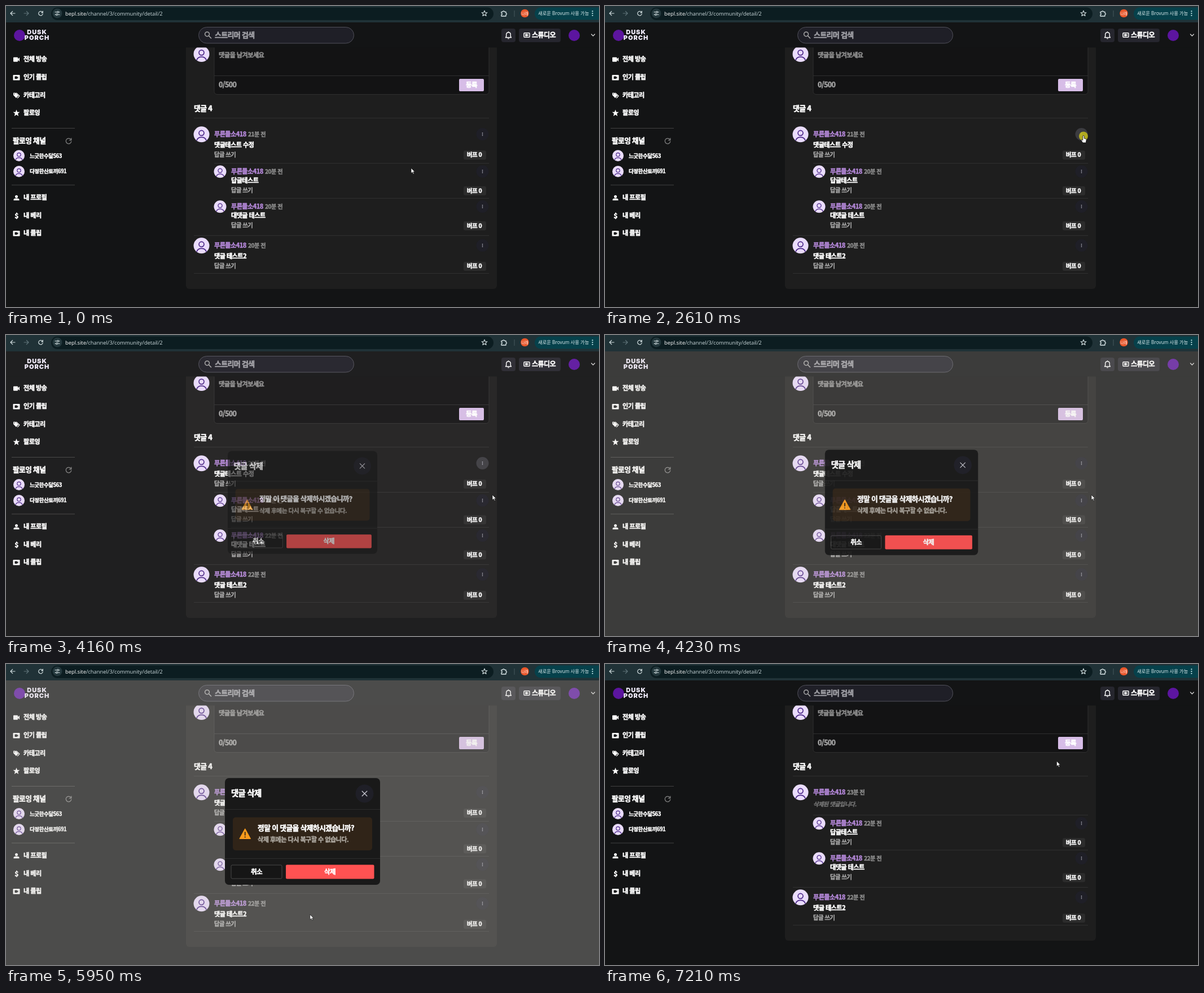
These frames come from a looping animation (1051 by 533 pixels, 8.42 s). An HTML page:

```html
<!DOCTYPE html>
<html lang="ko">
<head>
<meta charset="utf-8">
<title>Comment delete</title>
<style>
html, body { margin: 0; width: 100%; height: 100%; overflow: hidden; background: #131415; }
svg { display: block; width: 1051px; height: 533px; }
text { font-family: "Noto Sans CJK KR", "Noto Sans CJK", sans-serif; font-weight: 900; letter-spacing: -.05em; white-space: pre; }
.ui { font-family: "Open Sans", "Noto Sans CJK KR", sans-serif; font-weight: 400; letter-spacing: 0; }
.brand { font-family: Inter, sans-serif; font-weight: 900; letter-spacing: 1px; }
</style>
</head>
<body>
<svg id="stage" viewBox="0 0 1051 533"></svg>
<script>
const LOOP = 8420;
const USER = '푸른들소418';

// Drawing helpers, all returning SVG markup
const rect = (x, y, w, h, fill, r = 0, more = '') =>
  `<rect x="${x}" y="${y}" width="${w}" height="${h}" rx="${r}" fill="${fill}" ${more}/>`;
const circle = (x, y, r, fill, more = '') => `<circle cx="${x}" cy="${y}" r="${r}" fill="${fill}" ${more}/>`;
const path = (d, fill, more = '') => `<path d="${d}" fill="${fill}" ${more}/>`;
const line = (d, color, w = 1) =>
  path(d, 'none', `stroke="${color}" stroke-width="${w}" stroke-linecap="round" stroke-linejoin="round"`);
const rule = (x1, x2, y, color = '#303030') => rect(x1, y, x2 - x1, 1, color);
const at = (x, y, body) => `<g transform="translate(${x} ${y})">${body}</g>`;
const group = (id, body) => `<g id="${id}">${body}</g>`;

// Extra-heavy label; y is the visual centre of the line
function label(x, y, size, str, fill = '#fff', more = '') {
  const s = size * 1.06;
  return `<text x="${x}" y="${y + s * .38}" font-size="${s}" fill="${fill}" stroke="${fill}" ` +
    `stroke-width="${s * .045}" stroke-linejoin="round" ${more}>${str}</text>`;
}
const centred = (x, y, size, str, fill) => label(x, y, size, str, fill, 'text-anchor="middle"');
const uiText = (x, y, size, str, fill, more = '') =>
  `<text class="ui" x="${x}" y="${y}" font-size="${size}" fill="${fill}" ${more}>${str}</text>`;

function avatar(x, y, r) {
  const c = '#4c2888', w = r * .12;
  return at(x, y, circle(0, 0, r, '#eadcfc') +
    circle(0, -r * .17, r * .32, 'none', `stroke="${c}" stroke-width="${w}"`) +
    line(`M${-r * .6} ${r * .74}C${-r * .42} ${r * .24} ${r * .42} ${r * .24} ${r * .6} ${r * .74}`, c, w));
}

function star(r, fill, more) {
  const pts = Array.from({ length: 10 }, (_, i) => {
    const a = i * Math.PI / 5, d = i % 2 ? r * .42 : r;
    return `${(Math.sin(a) * d).toFixed(2)},${(-Math.cos(a) * d).toFixed(2)}`;
  });
  return `<polygon points="${pts.join(' ')}" fill="${fill}" ${more || ''}/>`;
}

const camera = (fill = '#fff') => rect(-5.5, -4, 8, 8, fill, 1) + path('M2.5-1L5.5-3.5V3.5L2.5 1Z', fill);
const clip = rect(-6, -4.8, 12, 9.6, '#fff', 1.2) + `<g transform="scale(.55)">${camera('#131415')}</g>`;
const tags = path('M-5.5-4.5H-1.5L3.5 .5L-.5 4.8L-5.5-.5Z', '#fff') +
  line('M0-4.2L5.4 1L2 4.6', '#fff', 1.3) + circle(-3.6, -2.6, .8, '#131415');
const person = circle(0, -2.4, 2.5, '#fff') + path('M-5 4.5V3C-5 0 5 0 5 3V4.5Z', '#fff');
const reload = (r, color) =>
  line(`M${r * .8} ${-r * .6}A${r} ${r} 0 1 0 ${r} ${r * .2}M${r} ${-r}V${-r * .3}H${r * .3}`, color, 1.2);
const cross = line('M-4.3-4.3L4.3 4.3M4.3-4.3L-4.3 4.3', '#c9c9d2', 1.3);
const mark = circle(0, 0, 10, '#5c159f');

// Comment parts
function menuButton(y, fill = '#1f1f27') {
  return circle(844.5, y, 11, fill) +
    [-2.3, 0, 2.3].map(d => circle(844.5, y + d, .8, '#c0c0cc')).join('');
}
function comment(x, y, r, nameX, mins, body, dy) {
  return avatar(x, y + .3, r) + label(nameX, y, 10.5, USER, '#b286d6') +
    label(nameX + 60, y, 9.6, `${mins}분 전`, '#8c8c8c') +
    (body ? label(nameX, y + dy[0], 10.5, body) + label(nameX, y + dy[1], 9.75, '답글 쓰기', '#a2a2a2') +
      rect(811, y + dy[1] - 7, 40, 16, '#2c2c2c', 3) + centred(830, y + dy[1] + .5, 9.9, '버프 0') +
      menuButton(y) : '');
}
function comments(mins, removed) {
  const up = removed ? 11 : 0;
  const sub = [16, 33.2], top = [18.5, 36];
  return rect(319, 60, 551, 441 - up, '#1e1e1e', 6) +
    comment(346.5, 227, 14, 369, mins[0], removed ? '' : '댓글테스트 수정', top) +
    (removed ? label(369, 248, 9.65, '삭제된 댓글입니다.', '#707070', 'font-style="italic"') : '') +
    at(0, -up,
      rule(369, 856, 278) + comment(379.5, 293, 11, 399, mins[1], '답글테스트', sub) +
      rule(399, 856, 340) + comment(379.5, 355, 11, 399, mins[2], '대댓글 테스트', sub) +
      rule(333, 856, 406) + comment(346.5, 424, 14, 369, mins[3], '댓글 테스트2', top) +
      rule(333, 856, 473));
}

const form = avatar(346.5, 85, 14) +
  rect(369, 60, 487, 96.5, '#131314', 5, 'stroke="#2f2f2f"') + rule(369, 856, 123, '#2f2f2f') +
  label(377, 87, 10.55, '댓글을 남겨보세요', '#8b8b8b') + label(377, 139.5, 11.8, '0/500', '#a0a0a0') +
  rect(803, 129, 44, 22, '#d7bde7', 2) + centred(825, 139.5, 10.9, '등록') +
  label(333, 181, 12.1, '댓글 4') + rule(333, 856, 198);

const header = rect(0, 29, 1051, 44.5, '#131415') + group('mark', at(24, 52, mark)) +
  '<g class="brand" fill="#f4efff" font-size="11" text-anchor="middle">' +
  '<text class="brand" x="55" y="50">DUSK</text><text class="brand" x="55" y="60">PORCH</text></g>' +
  rect(341.5, 37.5, 275, 28.5, '#1f1f27', 14.2, 'stroke="#50505a"') +
  circle(356.5, 49.8, 3.9, 'none', 'stroke="#aaa" stroke-width="1.5"') + line('M359.6 53L363.5 57', '#aaa', 1.6) +
  label(370, 51, 12.2, '스트리머 검색', '#9c9ca2') +
  rect(878, 40, 25, 24, '#26262e', 4) +
  at(890.5, 52, line('M-5 3.8H5L3.8 2V-1.5C3.8-6.6-3.8-6.6-3.8-1.5V2ZM0-5.3V-6.4', '#fff', 1.4) + path('M-1.8 5.2H1.8Q0 8-1.8 5.2', '#fff')) +
  rect(909, 40, 74, 24, '#26262e', 4) +
  at(923, 51.5, rect(-5, -3.8, 10, 7.6, 'none', 1, 'stroke="#fff" stroke-width="1.5"') + `<g transform="scale(.5)">${camera()}</g>`) +
  label(932, 51, 11.4, '스튜디오') + at(1007, 52, mark) + line('M1037.5 50L1040.5 53L1043.5 50', '#ddd', 1.2);

const dollar = centred(0, 0, 11.5, '$');
const nav = [
  [94, '전체 방송', camera()], [126, '인기 클립', clip], [157.5, '카테고리', tags], [189, '팔로잉', star(6.3, '#fff')],
  [339, '내 프로필', person], [370.5, '내 베리', dollar], [402, '내 클립', clip]
].map(([y, name, icon]) => at(18.5, y + .8, icon) + label(31, y, 10.5, name)).join('');

const sidebar = nav + rule(10, 122, 216, '#424242') + label(12, 238.5, 12, '팔로잉 채널') +
  at(111, 239, reload(4.8, '#858585')) +
  avatar(23, 265, 10) + label(42, 265, 9, '느긋한수달563') +
  avatar(23, 293, 10) + label(42, 292.5, 9, '다정한산토끼691') + rule(10, 122, 316.5, '#424242');

const dialog = rect(388, 202, 275, 189, '#191919', 7) + label(399, 229, 13.6, '댓글 삭제') +
  circle(635.5, 229.5, 16, '#1f1f27') + at(635.5, 229.5, cross) +
  rule(388, 663, 257, '#2d2d2d') + rule(388, 663, 344, '#2d2d2d') +
  rect(402, 271.5, 247, 58.5, '#302418', 5) +
  path('M423.7 292L433.2 309.3H414.2Z', '#f99b1c', 'stroke="#f99b1c" stroke-width="1.4" stroke-linejoin="round"') +
  line('M423.7 298V303', '#302418', 1.8) + circle(423.7, 306.4, 1.1, '#302418') +
  label(446, 290, 12.1, '정말 이 댓글을 삭제하시겠습니까?') +
  label(446, 311, 10.5, '삭제 후에는 다시 복구할 수 없습니다.', '#aaa59d') +
  rect(399, 356, 90, 24, '#161616', 2, 'stroke="#484848"') + centred(444, 367.5, 10.9, '취소') +
  rect(496, 355.5, 156.5, 25, '#ff5252', 2) + centred(574, 367.5, 10.9, '삭제');

const arrowLeft = color => line('M4-0H-4M-.3-3.7L-4 0L-.3 3.7', color, 1.2);
const browser = rect(0, 0, 1051, 29, '#203237') + rect(80, 2.5, 784, 22.5, '#0c1d21', 11.2) +
  at(12, 13, arrowLeft('#d6e2e4')) + at(36, 13, `<g transform="scale(-1 1)">${arrowLeft('#60757a')}</g>`) +
  at(61.5, 13, reload(3.8, '#d6e2e4')) + circle(91, 13, 8.5, '#24383d') +
  at(91, 13, line('M-4-2.2H-.6M2.6-2.2H4M-4 2.2H-2.6M.6 2.2H4', '#dce8ea', 1.1) +
    circle(1, -2.2, 1.4, 'none', 'stroke="#dce8ea"') + circle(-1, 2.2, 1.4, 'none', 'stroke="#dce8ea"')) +
  uiText(105, 16.8, 9.36, 'bepl.site<tspan fill="#cbd9dc">/channel/3/community/detail/2</tspan>', '#fff') +
  at(848, 13.3, star(5.2, 'none', 'stroke="#d6e2e4" stroke-width="1.1" stroke-linejoin="round"')) +
  at(882, 13.5, line('M-4-3.2H-1.5A1.4 1.4 0 0 1 1.3-3.2H4V-.8A1.4 1.4 0 0 1 4 2V4.5H-4V2A1.4 1.4 0 0 0-4-.8Z', '#dce8ea', 1.3)) +
  rect(900.5, 8, 1, 11, '#46595e') + circle(919.5, 13, 7.3, '#e8562a') +
  uiText(919.5, 15.5, 6.5, '나래', '#fff', 'text-anchor="middle"') +
  rect(937, 2.5, 130, 22, '#06414b', 11) + uiText(943, 16.2, 8.3, '새로운 Brovum 사용 가능', '#e2f1f3') +
  [9.3, 13, 16.7].map(y => circle(1039.5, y, 1.05, '#dff')).join('');

const cursor = group('ring', circle(0, 1, 8, '#c6bd1b', 'opacity=".85"')) +
  group('arrow', path('M0 0V9.2L2.2 7.2L3.8 10.5L5.3 9.8L3.7 6.7H6.6Z', '#fff', 'stroke="#111" stroke-width=".7"')) +
  group('hand', path('M-1.2 1.2A1.2 1.2 0 0 1 1.2 1.2V5L4.2 5.8Q5.4 6.2 5.2 7.5L4.6 10.6V12.6H-1.2L-3.8 8.6Q-4.4 7.2-3.2 7L-1.2 8.3Z', '#fff', 'stroke="#111" stroke-width=".8"'));

document.getElementById('stage').innerHTML =
  rect(0, 0, 1051, 533, '#131415') +
  group('before', comments([21, 20, 20, 20])) +
  group('later', comments([22, 22, 22, 22])) +
  group('removed', comments([23, 22, 22, 22], true)) +
  group('hover', menuButton(227, '#3c3c40')) +
  group('caret', rect(368, 241, 1, 11, '#ddd')) +
  form + header + sidebar +
  group('shade', rect(0, 29, 1051, 504, '#d2cec8')) +
  group('dialog', dialog) + browser + group('cursor', cursor);

const BURSTS = [[1040, 1790, 12], [2390, 3210, 13], [3280, 3420, 3], [3820, 4640, 13],
  [4700, 5320, 10], [5520, 6350, 13], [6420, 7210, 13]];
// time, x, y
const POINTER = [[980, 718, 287], [1790, 848, 258], [2390, 848, 258], [2595, 848, 229.5], [2800, 848, 229.5],
  [3210, 864, 279], [3420, 862, 283], [4240, 862, 283], [4640, 572, 345], [5044, 541, 358], [5320, 545, 362],
  [5500, 545, 362], [5720, 494, 420], [5860, 520, 490], [6060, 570, 366], [6140, 570, 366],
  [6350, 704, 236], [6420, 742, 205], [6552, 800, 163], [7210, 800.5, 172]];
// time, opacity, scale
const DIALOG = [[4094, 0, .95], [4162, .64, .9636], [4230, .92, .987], [4298, 1, 1],
  [6420, 1, 1], [6486, .88, .983], [6552, .67, .9636], [6618, .2, .953], [6684, 0, .95]];
// time, opacity
const SHADE = [[4094, 0], [4162, .06], [4230, .21], [4298, .3], [6486, .3], [6552, .275], [6618, .18], [6684, .07], [6750, 0]];

function sample(track, t) {
  if (t <= track[0][0]) return track[0].slice(1);
  const i = track.findIndex(k => k[0] > t);
  if (i < 0) return track[track.length - 1].slice(1);
  const a = track[i - 1], b = track[i], p = (t - a[0]) / (b[0] - a[0]);
  return a.slice(1).map((v, n) => v + (b[n + 1] - v) * p);
}

function heldTime(t) {
  let held = 0;
  for (const [start, end, count] of BURSTS) {
    if (t < start) break;
    const step = (end - start) / (count - 1);
    held = start + step * Math.min(count - 1, Math.floor((t - start) / step + .15));
  }
  return held;
}

const el = id => document.getElementById(id);
const show = (id, on) => { el(id).style.display = on ? '' : 'none'; };

function draw(t) {
  const now = heldTime(t);
  const [x, y] = sample(POINTER, now), [alpha, scale] = sample(DIALOG, now);
  const onMenu = Math.abs(x - 844.5) < 11 && Math.abs(y - 229) < 12;
  const onButton = alpha > .9 && x > 399 && x < 652 && y > 355 && y < 381;
  show('before', now < 3820);
  show('later', now >= 3820 && now < 6420);
  show('removed', now >= 6420);
  show('mark', now < 3820 || now >= 4700);
  show('hover', now >= 2500 && now < 4200);
  // The caret blinks until the click takes the focus away
  show('caret', t >= 70 && t < 2590 && (t - 70) % 1035 < 515);
  el('shade').setAttribute('opacity', sample(SHADE, now)[0]);
  el('dialog').setAttribute('opacity', alpha);
  el('dialog').setAttribute('transform', `translate(525.5 296.5) scale(${scale}) translate(-525.5 -296.5)`);
  el('cursor').setAttribute('transform', `translate(${x} ${y})`);
  show('ring', now >= 2560 && now < 2700);
  show('hand', onMenu || onButton);
  show('arrow', !onMenu && !onButton);
}

const begin = performance.now();
function tick() {
  draw((performance.now() - begin) % LOOP);
  requestAnimationFrame(tick);
}
tick();
</script>
</body>
</html>
```
